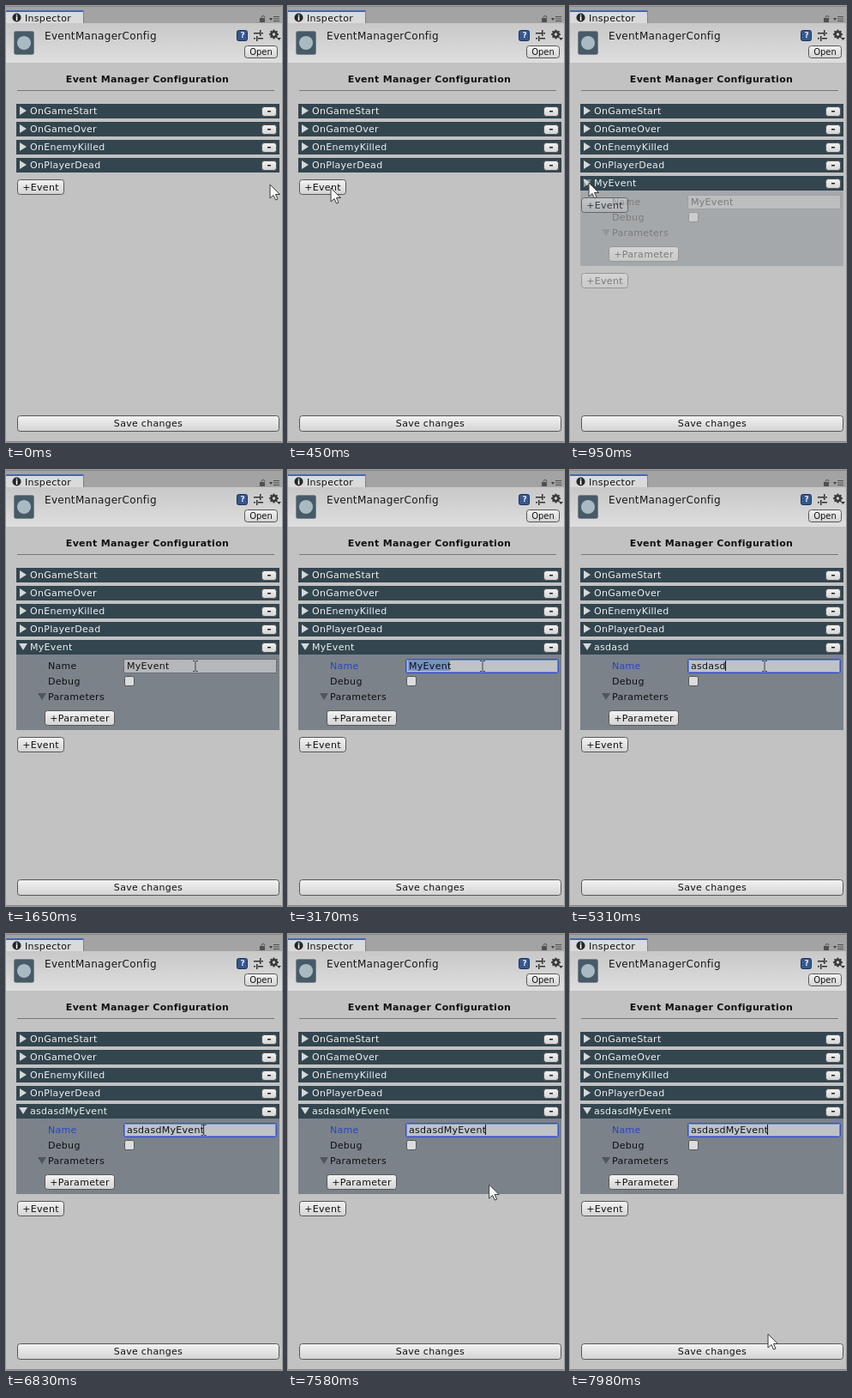
Recreate the animation shown at these times as an HTML page with a canvas. Size 322 px wide and 508 px high, loop 8000 ms.

```html
<!DOCTYPE html>
<html lang="en">
<head>
<meta charset="utf-8">
<title>Event manager inspector</title>
<style>
html, body { margin: 0; width: 100%; height: 100%; overflow: hidden; background: #c2c2c2; }
canvas { display: block; width: 322px; height: 508px; }
</style>
</head>
<body>
<canvas id="stage"></canvas>
<script>
const W = 322, H = 508, LOOP = 8000;
const FONT = '"DejaVu Sans", sans-serif';
const canvas = document.getElementById('stage');
const ctx = canvas.getContext('2d');
const ratio = window.devicePixelRatio || 1;
canvas.width = W * ratio;
canvas.height = H * ratio;

const ROWS = ['OnGameStart', 'OnGameOver', 'OnEnemyKilled', 'OnPlayerDead'];
const TYPED = 'asdasdMyEvent';
const KEY_TIMES = [3190, 3370, 3530, 3690, 3850, 4010, 5320, 5500, 5820, 5970, 6120, 6270, 6600];
const ADDED = 520, UNFOLD = 950, UNFOLDED = 990, FOCUS = 2000;

// Pointer moves: start, end, destination x, y
const MOVES = [
  [50, 430, 50, 212],
  [540, 770, 22, 206],
  [950, 1420, 221, 228],
  [1650, 2300, 227, 228],
  [6600, 7130, 236, 228],
  [7380, 7970, 231, 466]
];

function rect(x, y, w, h, color) {
  ctx.fillStyle = color;
  ctx.fillRect(x, y, w, h);
}

function verticalShade(y, h, top, bottom) {
  const shade = ctx.createLinearGradient(0, y, 0, y + h);
  shade.addColorStop(0, top);
  shade.addColorStop(1, bottom);
  return shade;
}

function text(str, x, y, color = '#101010', size = 11, weight = '', align = 'left') {
  ctx.font = `${weight} ${size}px ${FONT}`;
  ctx.letterSpacing = size < 11 ? '0px' : '0.3px';
  ctx.textAlign = align;
  ctx.fillStyle = color;
  ctx.fillText(str, x, y);
}

function polygon(points, fill, stroke) {
  ctx.beginPath();
  points.forEach(([x, y]) => ctx.lineTo(x, y));
  ctx.closePath();
  ctx.fillStyle = fill;
  ctx.fill();
  if (stroke) {
    ctx.strokeStyle = stroke;
    ctx.lineWidth = 1;
    ctx.stroke();
  }
}

function circle(x, y, r, color) {
  ctx.beginPath();
  ctx.arc(x, y, r, 0, 7);
  ctx.fillStyle = color;
  ctx.fill();
}

function box(x, y, w, h, radius, fill, stroke) {
  ctx.beginPath();
  ctx.roundRect(x + .5, y + .5, w - 1, h - 1, radius);
  ctx.fillStyle = fill;
  ctx.fill();
  ctx.strokeStyle = stroke;
  ctx.lineWidth = 1;
  ctx.stroke();
}

function button(label, x, y, w, h, size = 11) {
  box(x, y, w, h, 3, verticalShade(y, h, '#f4f4f4', '#d2d2d2'), '#565656');
  text(label, x + w / 2, Math.floor(y + h / 2) + 4, '#101010', size, '', 'center');
}

function foldout(x, y, open, color) {
  polygon(open
    ? [[x - 5, y - 4], [x + 5, y - 4], [x, y + 4]]
    : [[x - 4, y - 5], [x + 4, y], [x - 4, y + 5]], color);
}

function eventRow(label, y, open) {
  rect(12, y, 307, 17, '#33454f');
  foldout(20, y + 8, open, '#d3d8da');
  text(label, 28, y + 12, '#eef1f2');
  button('', 298, y + 3, 18, 12);
  rect(305, y + 8, 4, 1.5, '#202020');
}

function toolbarIcons() {
  // Lock and tab menu
  rect(296, 14, 6, 5, '#505050');
  ctx.strokeStyle = '#505050';
  ctx.lineWidth = 1;
  ctx.beginPath();
  ctx.arc(300, 13.5, 2, Math.PI, 0);
  ctx.stroke();
  polygon([[307, 14], [311, 14], [309, 17]], '#404040');
  for (let i = 0; i < 3; i++) rect(312, 12 + i * 2.5, 7, 1, '#505050');

  // Help, presets and settings
  box(269, 28, 13, 13, 2, '#35588e', '#1e3358');
  text('?', 276, 37, '#e8eef8', 9, 'bold', 'center');
  rect(289, 31, 7, 1.5, '#303030');
  rect(296, 28, 1.5, 7, '#303030');
  rect(298, 31, 2, 1.5, '#303030');
  rect(289, 37, 2, 1.5, '#303030');
  rect(292, 35, 1.5, 6, '#303030');
  rect(294, 37, 6, 1.5, '#303030');
  for (let i = 0; i < 8; i++) {
    const a = i * Math.PI / 4;
    circle(312.5 + 4.3 * Math.cos(a), 33 + 4.3 * Math.sin(a), 1.2, '#383838');
  }
  circle(312.5, 33, 4, '#383838');
  circle(312.5, 33, 1.7, '#d0d0d0');
  polygon([[316, 37], [321, 37], [318.5, 40]], '#303030');
}

function panelHeader() {
  rect(0, 0, W, H, '#c2c2c2');
  rect(0, 0, W, 20, '#a3a3a3');
  rect(0, 0, W, 1, '#868686');
  rect(0, 20, W, 46, verticalShade(20, 46, '#c8c8c8', '#dedede'));
  rect(0, 5, 90, 15, '#dadada');
  rect(0, 5, 90, 2, '#4368ad');
  rect(90, 5, 1, 15, '#808080');
  rect(0, H - 1, W, 1, '#858585');
  circle(12.5, 13.5, 5, '#252525');
  text('i', 12.5, 17, '#ffffff', 9, 'bold', 'center');
  text('Inspector', 22, 18);
  toolbarIcons();

  box(9, 29, 24, 28, 2, '#475a67', '#78868f');
  circle(21, 43, 8, '#a9bac3');
  text('EventManagerConfig', 45, 39, '#181818', 12);
  button('Open', 278, 46, 39, 15, 10);
  text('Event Manager Configuration', 165, 89, '#101010', 11, 'bold', 'center');
  rect(13, 98, 300, 1, '#777777');
}

function details(name, focused, selected, caret) {
  rect(12, 215, 307, 88, '#7b828a');
  text('Name', 49, 232, focused ? '#2345cf' : '#101010');
  if (focused) {
    box(137, 220, 179, 17, 1, '#bfc3c8', '#3450c4');
    box(138, 221, 177, 15, 0, '#bfc3c8', '#7486cb');
  } else {
    box(137, 220, 179, 17, 0, '#b5b8bb', '#6a6e74');
  }
  if (selected) rect(140, 222, 49, 12, '#7592c4');
  text(name, 141, 232);
  if (caret) rect(Math.round(140 + ctx.measureText(name).width), 222, 1, 12, '#101010');
  text('Debug', 49, 250);
  box(138, 240, 12, 12, 2, '#dcdcdc', '#50545a');
  foldout(42, 264, true, '#50565c');
  text('Parameters', 49, 268);
  button('+Parameter', 45, 280, 82, 18);
}

function scene(t, open) {
  const count = KEY_TIMES.filter(time => t >= time).length;
  const name = count ? TYPED.slice(0, count) : 'MyEvent';
  const focused = t >= FOCUS;
  panelHeader();
  ROWS.forEach((label, i) => eventRow(label, 114 + i * 21, false));
  if (t >= ADDED) eventRow(name, 198, open);
  if (open) details(name, focused, focused && !count, count > 0);
  button('+Event', 13, open ? 311 : t >= ADDED ? 223 : 202, 55, 18);
  button('Save changes', 13, 477, 306, 19);
}

function pointerAt(t) {
  let x = 308, y = 208;
  for (const [start, end, toX, toY] of MOVES) {
    const p = Math.min(1, Math.max(0, (t - start) / (end - start)));
    const eased = p * p * (3 - 2 * p);
    x += (toX - x) * eased;
    y += (toY - y) * eased;
  }
  return [x, y];
}

function pointer(t) {
  const [x, y] = pointerAt(t);
  const overField = t > UNFOLDED && x > 137 && x < 316 && y > 219 && y < 237;
  if (overField) {
    rect(x - .5, y - 5, 1, 11, '#404246');
    for (const edge of [y - 6, y + 6]) {
      rect(x - 3, edge, 2.5, 1, '#404246');
      rect(x + .5, edge, 2.5, 1, '#404246');
    }
    return;
  }
  const outline = [[0, 0], [0, 16], [4, 12.5], [6.5, 18], [9, 17], [6.5, 11.5], [11.5, 11.5]];
  polygon(outline.map(([dx, dy]) => [x + dx, y + dy]), '#f6f6f6', '#3c3c3c');
}

function draw() {
  const t = performance.now() % LOOP;
  ctx.setTransform(ratio, 0, 0, ratio, 0, 0);
  scene(t, t >= UNFOLDED);
  if (t >= UNFOLD && t < UNFOLDED) {
    // The unfolded panel briefly shows through as it opens
    const layer = document.createElement('canvas');
    layer.width = canvas.width;
    layer.height = canvas.height;
    layer.getContext('2d').drawImage(canvas, 0, 0);
    scene(t, true);
    ctx.globalAlpha = .6;
    ctx.drawImage(layer, 0, 0, W, H);
    ctx.globalAlpha = 1;
  }
  pointer(t);
  requestAnimationFrame(draw);
}
draw();
</script>
</body>
</html>
```
